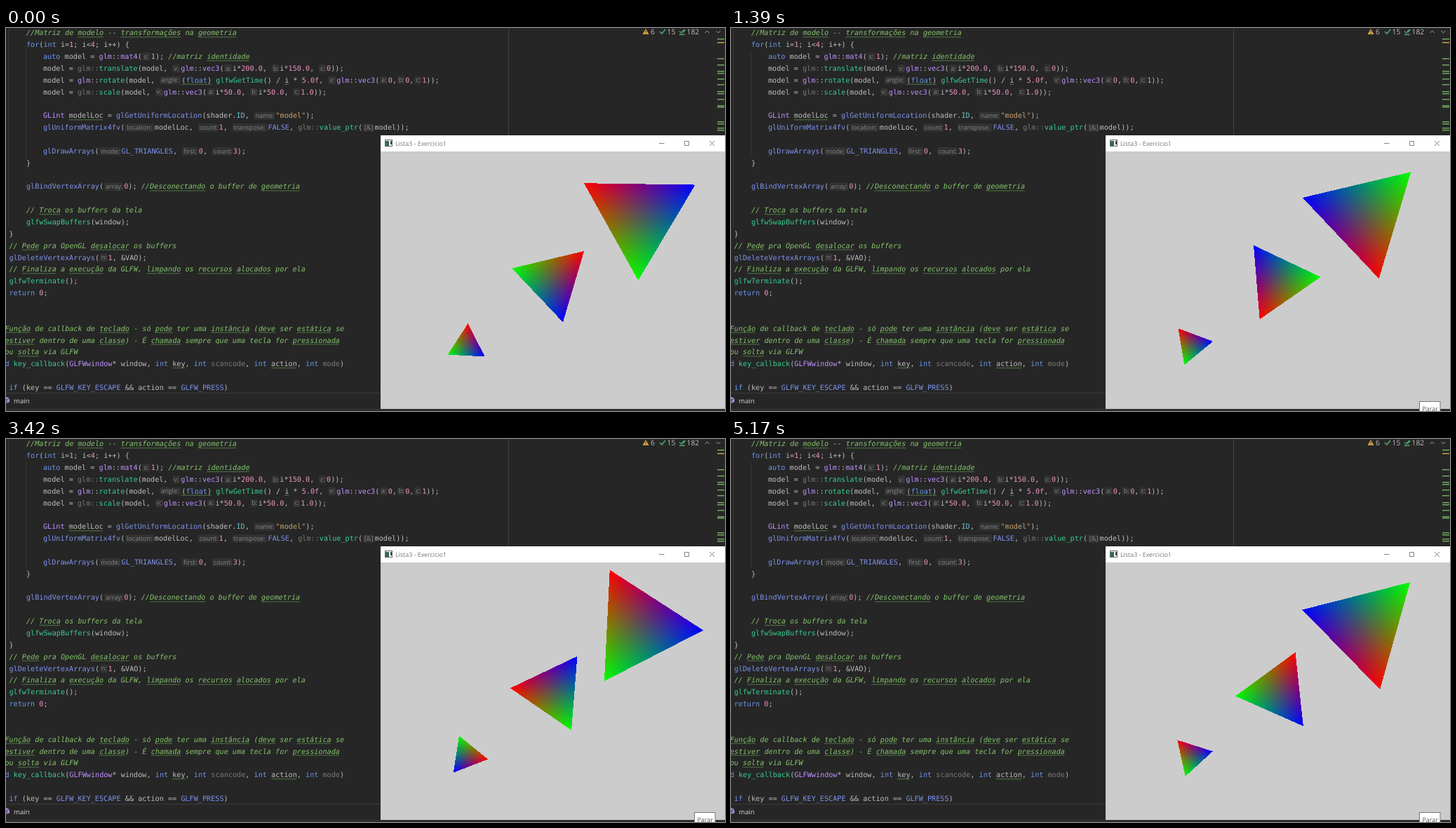
An HTML page for the animation above (5220 ms loop, 1025 by 546 pixels).

```html
<!DOCTYPE html>
<html lang="pt">
<head>
<meta charset="utf-8">
<title>Lista3 - Exercicio1</title>
<style>
html, body { margin: 0; width: 100%; height: 100%; overflow: hidden; background: #262626; }
svg { display: block; }
text { white-space: pre; text-rendering: geometricPrecision; }
.code text { font: 10.17px "DejaVu Sans Mono", monospace; }
.code .c { fill: #85c46c; font-style: italic; }
.p { fill: #bdbdbd; }
.k { fill: #6c95eb; }
.f { fill: #39cc8f; }
.n { fill: #ed94c0; }
.t { fill: #c191ff; }
.m { fill: #7e93ee; }
.s { fill: #c9a26d; }
.i { fill: #66c3cc; }
.d { fill: #787878; }
.code .h { fill: #858585; font: 9.1px "Open Sans", sans-serif; }
.box { fill: #323232; }
.wave { fill: none; stroke: #5f9d4d; stroke-width: .8; }
.ui { font: 10.3px "Open Sans", sans-serif; fill: #bdbdbd; }
.small { font: 8.9px "Open Sans", sans-serif; fill: #777; }
.tri { isolation: isolate; }
.tri polygon { shape-rendering: crispEdges; }
.mix { mix-blend-mode: screen; }
</style>
</head>
<body>
<svg id="stage" width="1025" height="546" viewBox="0 0 1025 546">
  <defs id="defs">
    <clipPath id="view"><rect x="534" y="176" width="491" height="367"/></clipPath>
  </defs>
  <rect width="1025" height="546" fill="#262626"/>
  <path d="M3.5 0V284M28.5 33V185" stroke="#363636"/>
  <path d="M716.5 0V153" stroke="#424242"/>
  <g class="code" id="code"></g>

  <g fill="none" stroke-width="1.6">
    <path d="M912 1L916.5 9H907.5Z" fill="#d9a343"/>
    <path d="M912 3.5V6M912 7V8" stroke="#262626" stroke-width="1"/>
    <path d="M932 5L935 8L940 2" stroke="#4fa66b"/>
    <path d="M960 4.5L962.5 7L967 2M964.5 6.5L968.5 2.5M960 10l1.5-1.5l1.5 1.5l1.5-1.5l1.5 1.5l1.5-1.5" stroke="#4fa66b" stroke-width="1.2"/>
    <path d="M996.5 7L999.5 4L1002.5 7M1012.5 4L1015.5 7L1018.5 4" stroke="#a5a5a5" stroke-width="1"/>
  </g>
  <text class="ui" x="919" y="9">6</text>
  <text class="ui" x="942.5" y="9">15</text>
  <text class="ui" x="970.5" y="9">182</text>
  <g id="marks"></g>

  <path d="M0 520.5H534" stroke="#3b3b3b"/>
  <path d="M0 543.5H1025" stroke="#3a3a3a"/>
  <rect y="544" width="1025" height="2" fill="#2b2b2b"/>
  <path d="M-3 528L1 526L5 528V533L1 535L-3 533Z" fill="#a78bdb"/>
  <path d="M-3 528L1 530L5 528M1 530V535" fill="none" stroke="#262626" stroke-width=".8"/>
  <text class="ui" x="11" y="534.5" style="fill:#d6d6d6;font-size:9.6px">main</text>

  <rect x="534" y="153" width="491" height="390" fill="#cccccc"/>
  <rect x="534" y="153" width="491" height="23" fill="#fff"/>
  <rect x="540.5" y="159.5" width="10" height="9" fill="#fff" stroke="#666"/>
  <rect x="541" y="161" width="5" height="7" fill="#2f6b5c"/>
  <rect x="548" y="161" width="2" height="5" fill="#444"/>
  <text class="small" x="555" y="168">Lista3 - Exercicio1</text>
  <path d="M931 164.5H938.5M967.5 161.5H973.5V167.5H967.5ZM1003 161L1010 168M1010 161L1003 168" fill="none" stroke="#777" stroke-width=".9"/>
  <g id="scene" clip-path="url(#view)"></g>
  <g id="tip">
    <rect x="981.5" y="532.5" width="29.5" height="18" fill="#fff" stroke="#777"/>
    <text class="small" x="985.5" y="546" style="fill:#555">Parar</text>
  </g>
</svg>
<script>
const $ = id => document.getElementById(id);

function add(parent, tag, attrs, text) {
  const el = document.createElementNS("http://www.w3.org/2000/svg", tag);
  for (const k in attrs) el.setAttribute(k, attrs[k]);
  if (text) el.textContent = text;
  parent.appendChild(el);
  return el;
}

// Tokens are "class:text"; a capital class is underlined, "h<width>" is an inline hint.
const ADV = 6.122, LINE = 16.85, TOP = 10.4;

function wave(x, y, w) {
  let d = `M${x} ${y}`;
  for (let i = 1; i * 1.5 <= w; i++) d += `L${x + i * 1.5} ${y - (i % 2) * 1.5}`;
  add($("code"), "path", { class: "wave", d });
}

function row(n, x, src) {
  const y = TOP + n * LINE, code = $("code");
  for (const token of src.split("~")) {
    const [, type, width, text] = token.match(/^(\w)([\d.]*):(.*)$/);
    const cls = type.toLowerCase();
    const w = cls === "h" ? +width : text.length * ADV;
    if (cls === "h") {
      add(code, "rect", { class: "box", x: x + .6, y: y - 9, width: w - 1.6, height: 11.5, rx: 2 });
      add(code, "text", { class: "h", x: x + 2.7, y: y - .4 }, text);
    } else {
      add(code, "text", { class: cls, x, y }, text);
      if (type !== cls) wave(x, y + 3.2, w);
    }
    x += w;
  }
}

const a = "h12.4:a:~", b = "h12.2:b:~", c = "h11.7:c:~";
const vec3 = "h12.7:v:~t:glm~p:::~t:vec3~p:(~" + a;
row(0, 29, "c://Matriz de ~C:modelo~c: -- ~C:transformações~c: na ~C:geometria");
row(1, 29, "k:for~p:(~k:int~p: i=~n:1~p:; i<~n:4~p:; i++) {");
row(2, 53, "k:auto~p: model = ~t:glm~p:::~t:mat4~p:(~h13:s:~n:1~p:); ~c://matriz ~C:identidade");
row(3, 53, `p:model = ~d:glm::~f:translate~p:(model, ~${vec3}p:i*~n:200.0~p:, ~${b}p:i*~n:150.0~p:, ~${c}n:0~p:));`);
row(4, 53, `p:model = ~t:glm~p:::~f:rotate~p:(model, ~h32:angle:~P:(~K:float~P:)~p: ~f:glfwGetTime~p:() / ~P:i~p: * ~n:5.0f~p:, ~${vec3}n:0~p:,~${b}n:0~p:,~${c}n:1~p:));`);
row(5, 53, `p:model = ~d:glm::~f:scale~p:(model, ~${vec3}p:i*~n:50.0~p:, ~${b}p:i*~n:50.0~p:, ~${c}n:1.0~p:));`);
row(7, 53, "t:GLint~p: ~P:modelLoc~p: = ~m:glGetUniformLocation~p:(shader.~i:ID~p:, ~h31.5:name:~s:\"model\"~p:);");
row(8, 53, "m:glUniformMatrix4fv~p:(~h42.5:location:~p:modelLoc, ~h30.5:count:~n:1~p:, ~h51.5:transpose:~m:FALSE~p:, ~d:glm::~f:value_ptr~p:(~h17.5:[&]~p:model));");
row(10, 53, "m:glDrawArrays~p:(~h32:mode:~m:GL_TRIANGLES~p:, ~h24.5:first:~n:0~p:, ~h30.5:count:~n:3~p:);");
row(11, 29, "p:}");
row(13, 29, "m:glBindVertexArray~p:(~h29:array:~n:0~p:); ~c://~C:Desconectando~c: o buffer de ~C:geometria");
row(15, 29, "c:// ~C:Troca~c: os buffers da tela");
row(16, 29, "f:glfwSwapBuffers~p:(window);");
row(17, 4.5, "p:}");
row(18, 4.5, "c:// ~C:Pede~c: pra OpenGL ~C:desalocar~c: os buffers");
row(19, 4.5, "m:glDeleteVertexArrays~p:(~h12.5:n:~n:1~p:, &VAO);");
row(20, 4.5, "c:// ~C:Finaliza~c: a ~C:execução~c: da GLFW, ~C:limpando~c: os ~C:recursos~c: ~C:alocados~c: por ela");
row(21, 4.5, "f:glfwTerminate~p:();");
row(22, 4.5, "k:return~p: ~n:0~p:;");
row(25, -1.5, "C:Função~c: de callback de ~C:teclado~c: - só ~C:pode~c: ter uma ~C:instância~c: (~C:deve~c: ser ~C:estática~c: se");
row(26, -1.5, "C:estiver~c: dentro de uma ~C:classe~c:) - É ~C:chamada~c: sempre que uma tecla for ~C:pressionada");
row(27, -1.5, "c:ou ~C:solta~c: via GLFW");
row(28, -1.5, "k:d~p: ~f:key_callback~p:(~t:GLFWwindow~p:* window, ~k:int~p: ~P:key~p:, ~k:int~d: scancode~p:, ~k:int~p: ~P:action~p:, ~k:int~d: mode~p:)");
row(30, 4.5, "k:if~p: (key == ~m:GLFW_KEY_ESCAPE~p: && action == ~m:GLFW_PRESS~p:)");

function mark(y, fill) {
  add($("marks"), "rect", { x: 1014, y: y - 1, width: 10, height: 1.5, fill });
}
for (const y of [16, 44, 53, 62, 65, 73, 81, 91, 94, 102, 111, 113, 134, 137, 143, 146]) mark(y, "#6fa85c");
mark(21, "#c9a03f");

// One gradient per corner, each fading to black at the opposite side.
["#f00", "#0f0", "#00f"].forEach((color, i) => {
  const g = add($("defs"), "linearGradient", {
    id: "corner" + i, gradientUnits: "userSpaceOnUse",
    x1: 1, y1: 0, x2: -.5, y2: 0, gradientTransform: `rotate(${i * 120})`
  });
  add(g, "stop", { offset: 0, "stop-color": color });
  add(g, "stop", { offset: 1, "stop-color": "#000" });
});

const points = "1,0 -.5,.8660254 -.5,-.8660254";
const tris = [91.3, 45.6, 150.6].map((phase, k) => {
  const el = add($("scene"), "g", { class: "tri" });
  add(el, "polygon", { points, fill: "#000" });
  for (let n = 0; n < 3; n++) add(el, "polygon", { points, class: "mix", fill: `url(#corner${n})` });
  return { el, phase, i: k + 1 };
});

// Each run is [start, step]: the picture is held for one step.
const LOOP = 5220, TIP_AT = 1228;
const runs = [[0, 30], [30, 54], [570, 50], [1120, 54], [1390, 50], [2790, 53], [3320, 50]];

function draw(ms) {
  const t = ms % LOOP;
  const [start, step] = runs.filter(r => r[0] <= t).pop();
  const tick = start + Math.floor((t - start) / step) * step;
  const sec = (tick || -15) / 1000;
  for (const { el, phase, i } of tris) {
    const angle = phase + sec / i * 5 * 180 / Math.PI;
    const x = 534.2 + i * 122.8, y = 543.6 - i * 91.8, r = i * 30.55;
    el.setAttribute("transform", `translate(${x} ${y}) rotate(${-angle}) scale(${r} ${-r})`);
  }
  $("tip").style.display = tick >= TIP_AT ? "" : "none";
}

const begin = performance.now();
function loop() {
  draw(performance.now() - begin);
  requestAnimationFrame(loop);
}
loop();
</script>
</body>
</html>
```
